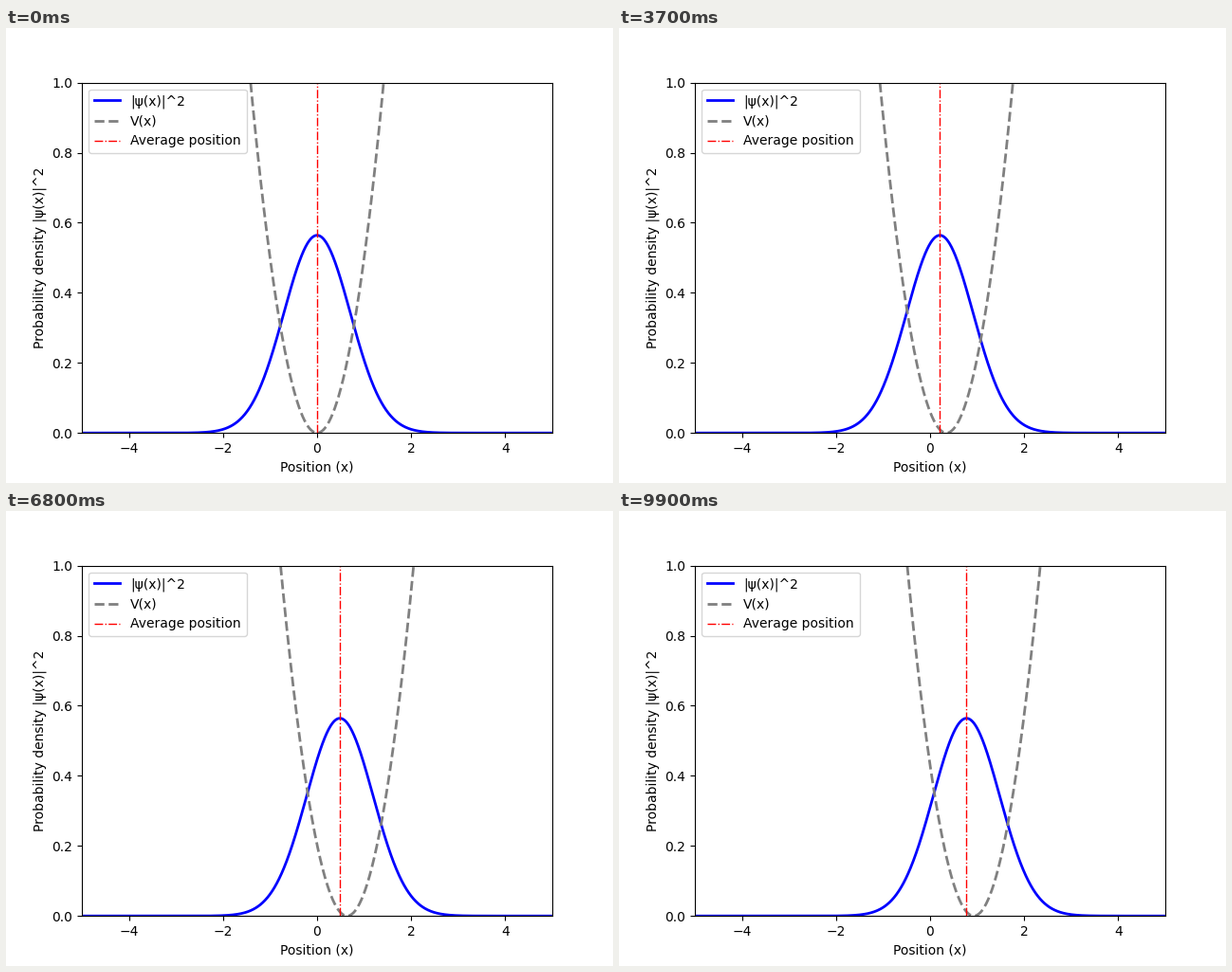
Animation, 640 px wide and 480 px high, one loop 10 s. Source, as a matplotlib script:

```python
import numpy as np
import matplotlib.pyplot as plt
from matplotlib.animation import FuncAnimation

FRAMES = 100
DT = 1 / 16      # model time per frame
SPEED = 0.15     # drift of the trap

x = np.linspace(-5, 5, 1000)


def trap_center(n):
    return SPEED * DT * n


def mean_position(n):
    """Packet centre, relaxing towards the moving trap at unit rate."""
    lag = SPEED * DT / (1 - np.exp(-DT))
    return trap_center(n) - lag * (1 - np.exp(-DT * n))


def density(n):
    return np.exp(-(x - mean_position(n)) ** 2) / np.sqrt(np.pi)


def potential(n):
    return 0.5 * (x - trap_center(n)) ** 2


fig, ax = plt.subplots(figsize=(6.4, 4.8), dpi=100)
ax.set_xlim(-5, 5)
ax.set_ylim(0, 1)
ax.set_xlabel("Position (x)")
ax.set_ylabel("Probability density |ψ(x)|^2")

psi_line, = ax.plot(x, density(0), color="blue", lw=2, label="|ψ(x)|^2")
v_line, = ax.plot(x, potential(0), color="gray", ls="--", lw=2, label="V(x)")
mean_line = ax.axvline(0, color="red", ls="-.", lw=1, label="Average position")
ax.legend(loc="upper left")


def update(n):
    psi_line.set_ydata(density(n))
    v_line.set_ydata(potential(n))
    mean_line.set_xdata([mean_position(n)] * 2)
    return psi_line, v_line, mean_line


anim = FuncAnimation(fig, update, frames=FRAMES, interval=100, repeat=True,
                     repeat_delay=0)
plt.show()
```
